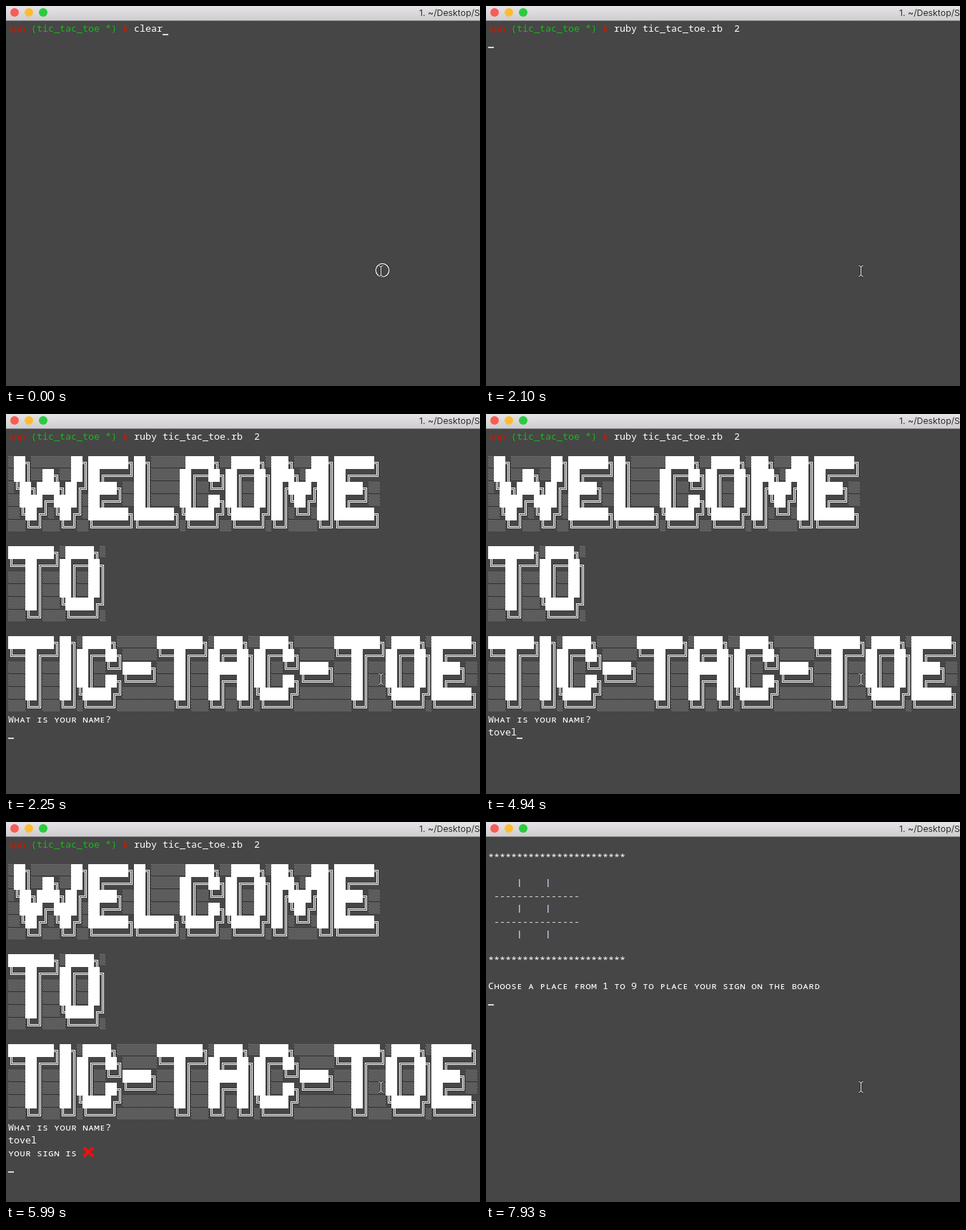
Write an HTML page with a canvas that moves like this. It is 663 by 532 pixels and loops after 8 s.

```html
<!DOCTYPE html>
<html lang="en">
<head>
<meta charset="utf-8">
<title>Tic-tac-toe in the terminal</title>
<style>
html, body { margin: 0; width: 100%; height: 100%; overflow: hidden; background: #464646; }
canvas { display: block; }
</style>
</head>
<body>
<canvas id="stage" width="663" height="532"></canvas>
<script>
const ctx = document.getElementById('stage').getContext('2d');
const LOOP = 8000, CELL_W = 8, CELL_H = 18, LEFT = 3, TOP = 23;
const BG = '#464646', WHITE = '#fff', RED = '#c91b00', GREEN = '#12bd12', SIGN_RED = '#f20d0d';
const PLAYER = 'tovel', KEY_TIMES = [4040, 4340, 4490, 4640, 4940];

const GLYPHS = {
  W: '░██╗░░░░░░░██╗ ░██║░░██╗░░██║ ░╚██╗████╗██╔╝ ░░████╔═████║░ ░░╚██╔╝░╚██╔╝░ ░░░╚═╝░░░╚═╝░░',
  E: '███████╗ ██╔════╝ █████╗░░ ██╔══╝░░ ███████╗ ╚══════╝',
  L: '██╗░░░░░ ██║░░░░░ ██║░░░░░ ██║░░░░░ ███████╗ ╚══════╝',
  C: '░█████╗░ ██╔══██╗ ██║░░╚═╝ ██║░░██╗ ╚█████╔╝ ░╚════╝░',
  O: '░█████╗░ ██╔══██╗ ██║░░██║ ██║░░██║ ╚█████╔╝ ░╚════╝░',
  M: '███╗░░░███╗ ████╗░████║ ██╔████╔██║ ██║╚██╔╝██║ ██║░╚═╝░██║ ╚═╝░░░░░╚═╝',
  T: '████████╗ ╚══██╔══╝ ░░░██║░░░ ░░░██║░░░ ░░░██║░░░ ░░░╚═╝░░░',
  I: '██╗ ██║ ██║ ██║ ██║ ╚═╝',
  A: '░█████╗░ ██╔══██╗ ███████║ ██╔══██║ ██║░░██║ ╚═╝░░╚═╝',
  '-': '░░░░░░ ░░░░░░ █████╗ ╚════╝ ░░░░░░ ░░░░░░'
};
// Which way each corner opens: [right, down]
const CORNERS = { '╔': [1, 1], '╗': [0, 1], '╚': [1, 0], '╝': [0, 0] };
// Offsets of the double lines inside a cell
const X1 = 3, X2 = 5, Y1 = 8, Y2 = 10;

const SMALL = 'ᴀʙᴄᴅᴇғɢʜɪᴊᴋʟᴍɴᴏᴘǫʀsᴛᴜᴠᴡxʏᴢ';
const smallCaps = s => s.replace(/[a-z]/g, c => SMALL[c.charCodeAt(0) - 97]);
const cellX = col => LEFT + col * CELL_W;
const cellY = row => TOP + row * CELL_H;

function rect(x, y, w, h, color) {
  ctx.fillStyle = color;
  ctx.fillRect(x, y, w, h);
}

function circle(x, y, r) {
  ctx.beginPath();
  ctx.arc(x, y, r, 0, 2 * Math.PI);
}

function stroke(width, color) {
  ctx.lineWidth = width;
  ctx.strokeStyle = color;
  ctx.stroke();
}

function print(text, col, row, color = WHITE) {
  ctx.font = '13.33px "Noto Sans Mono", "DejaVu Sans Mono", monospace';
  ctx.fillStyle = color;
  [...text].forEach((c, i) => ctx.fillText(c, cellX(col + i), cellY(row) + 13));
}

const caret = (col, row) => rect(cellX(col), cellY(row) + 16, CELL_W, 2, '#d8d8d8');

function blockChar(c, x, y) {
  const bar = (dx, dy, w, h) => rect(x + dx, y + dy, w, h, WHITE);
  if (c === '█') bar(0, 0, CELL_W, CELL_H);
  else if (c === '═') for (const dy of [Y1, Y2]) bar(0, dy, CELL_W, 1);
  else if (c === '║') for (const dx of [X1, X2]) bar(dx, 0, 1, CELL_H);
  else if (c === '░') {
    for (let dy = 0; dy < CELL_H - 2; dy += 2)
      for (let dx = dy / 2 % 2; dx < CELL_W; dx += 2) rect(x + dx, y + dy, 1, 1, '#a0a0a0');
  } else {
    const [right, down] = CORNERS[c];
    for (const outer of [1, 0]) {
      const dx = outer === right ? X1 : X2, dy = outer === down ? Y1 : Y2;
      if (right) bar(dx, dy, CELL_W - dx, 1); else bar(0, dy, dx + 1, 1);
      if (down) bar(dx, dy, 1, CELL_H - dy); else bar(dx, 0, 1, dy + 1);
    }
  }
}

function banner(word, row) {
  let col = 0;
  for (const letter of word) {
    const lines = GLYPHS[letter].split(' ');
    lines.forEach((line, r) =>
      [...line].forEach((c, i) => blockChar(c, cellX(col + i), cellY(row + r))));
    col += lines[0].length;
  }
}

function titleBar() {
  const shade = ctx.createLinearGradient(0, 0, 0, 20);
  shade.addColorStop(0, '#e6e4e6');
  shade.addColorStop(1, '#cfcdcf');
  rect(0, 0, 663, 20, shade);
  rect(0, 20, 663, 1, '#8c8b8c');
  ['#fc5b54', '#fdbc30', '#29cb41'].forEach((color, i) => {
    circle(12 + 20 * i, 9, 6);
    ctx.fillStyle = color;
    ctx.fill();
  });
  ctx.font = '12.3px Inter, sans-serif';
  ctx.fillStyle = '#303030';
  ctx.fillText('1. ~/Desktop/S', 578, 14);
}

function pointer(ring) {
  if (ring) {
    circle(526.5, 370, 9.3);
    stroke(2.6, '#222');
    stroke(1.3, WHITE);
  }
  ctx.beginPath();
  for (const side of [-3, 3]) {
    ctx.moveTo(524.5 + side, 363.5);
    ctx.quadraticCurveTo(524.5, 363.5, 524.5, 366.5);
    ctx.lineTo(524.5, 375.5);
    ctx.quadraticCurveTo(524.5, 378.5, 524.5 + side, 378.5);
  }
  stroke(2.6, '#222');
  stroke(1, WHITE);
}

function crossSign(x, y) {
  ctx.beginPath();
  for (const side of [-1, 1]) {
    ctx.moveTo(x - 6.8 * side, y - 6);
    ctx.lineTo(x + 6.8 * side, y + 6);
  }
  stroke(4, SIGN_RED);
}

function ringSign(x, y) {
  circle(x, y, 6.6);
  stroke(2.4, SIGN_RED);
}

function prompt(command) {
  print('app', 0, 0, RED);
  print('(tic_tac_toe *)', 4, 0, GREEN);
  print('$', 20, 0, RED);
  print(command, 22, 0);
}

function welcome(t) {
  banner('WELCOME', 2);
  banner('TO', 9);
  banner('TIC-TAC-TOE', 16);
  print(smallCaps('What is your name?'), 0, 22);
  const typed = KEY_TIMES.filter(k => t >= k).length;
  print(PLAYER.slice(0, typed), 0, 23);
  if (t < 5990) return caret(typed, 23);
  print(smallCaps('your sign is'), 0, 24);
  crossSign(115.5, 462);
  if (t < 7040) return caret(0, 25);
  print(smallCaps("your opponent Bot's sign is"), 0, 25);
  ringSign(235.5, 480);
  caret(0, 26);
}

function board() {
  for (const row of [1, 9]) print('*'.repeat(24), 0, row);
  for (const row of [3, 5, 7])
    for (const col of [5, 10]) rect(cellX(col) + 3, cellY(row) + 3, 1.5, 11, '#a9c4e6');
  for (const row of [4, 6]) print('-'.repeat(15), 1, row, '#d8d8d8');
  print(smallCaps('Choose a place from 1 to 9 to place your sign on the board'), 0, 11);
  caret(0, 12);
}

function draw(t) {
  rect(0, 0, 663, 532, BG);
  titleBar();
  if (t >= 7930) board();
  else if (t < 150) {
    prompt('clear');
    caret(27, 0);
  } else {
    prompt('ruby tic_tac_toe.rb  2');
    if (t < 2100) caret(44, 0);
    else if (t < 2250) caret(0, 1);
    else welcome(t);
  }
  pointer(t < 150);
}

const start = performance.now();
function tick() {
  draw((performance.now() - start) % LOOP);
  requestAnimationFrame(tick);
}
tick();
</script>
</body>
</html>
```
